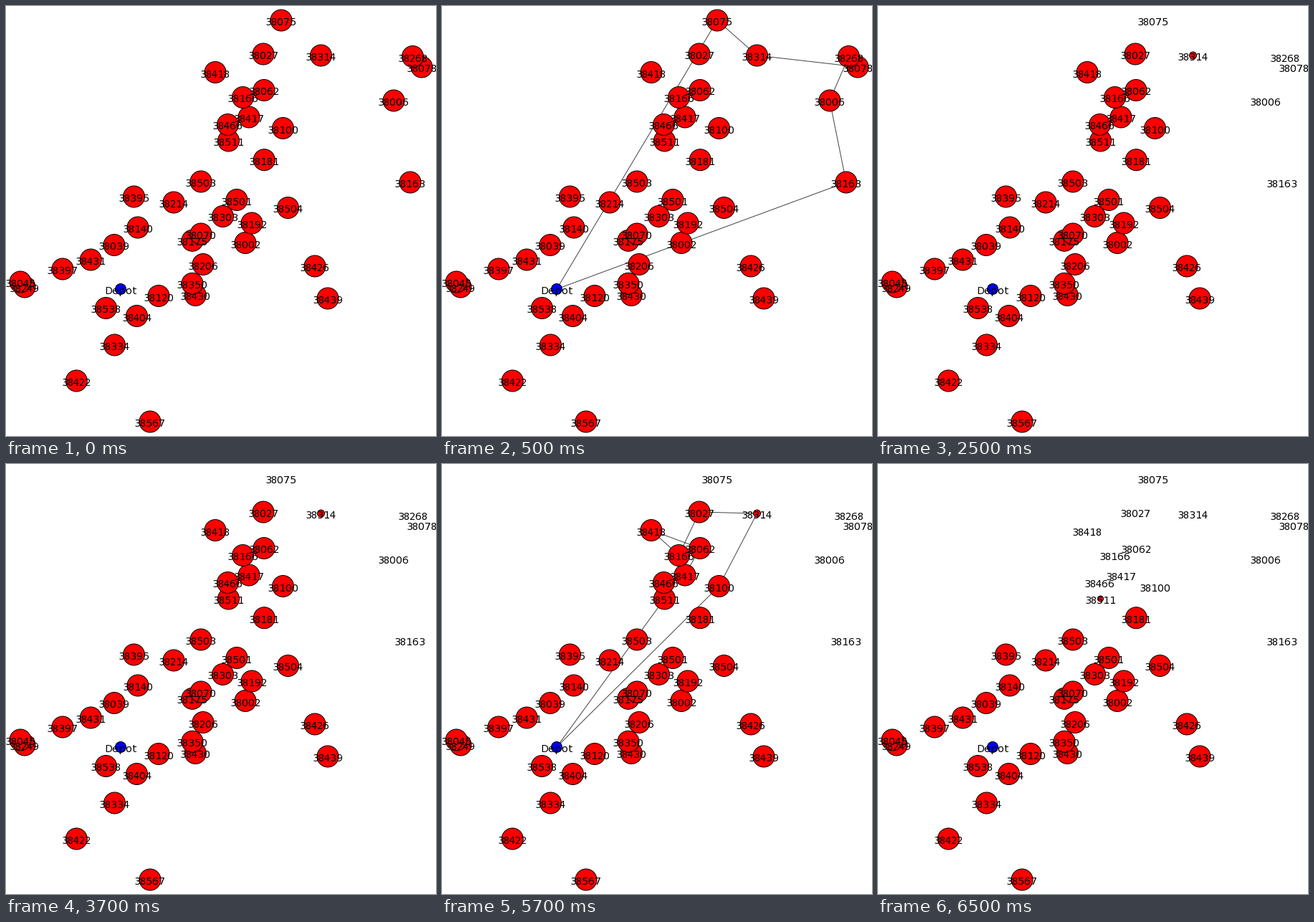
A matplotlib script that plays this animation: 600 px wide and 600 px high, repeating every 8000 ms.

```python
import matplotlib.pyplot as plt
from matplotlib.animation import FuncAnimation
from matplotlib.patches import Circle

SIZE, DPI = 600, 100
PX = 72 / DPI  # points per pixel
FRAMES, INTERVAL = 16, 500
STAGE_STARTS = (1, 5, 9, 13)
FULL_RADIUS, DEPOT_RADIUS = 15, 7.5

plt.rcParams["font.family"] = "DejaVu Sans"
plt.rcParams["text.hinting_factor"] = 1

DEPOT = "Depot"
STOPS = {
    38075: (384, 20), 38027: (359, 67), 38314: (439.5, 69),
    38268: (567.5, 70.5), 38078: (580, 85), 38418: (292, 92.5),
    38062: (360, 117.5), 38166: (330.5, 127.5), 38006: (541, 132),
    38417: (339, 155), 38466: (309.5, 165.5), 38100: (386.5, 170.5),
    38511: (310.5, 188), 38181: (360.3, 214.7), 38503: (272, 245),
    38163: (564, 246), 38395: (178.5, 266), 38501: (322, 270.5),
    38214: (234, 274), 38504: (393.5, 281.5), 38303: (302.5, 293.5),
    38192: (343, 303), 38140: (184, 309), 38070: (272, 318),
    38175: (260, 327.3), 38002: (334, 330.5), 38039: (151, 333.5),
    38431: (118.3, 354), 38206: (275, 360.5), 38426: (431, 363),
    38397: (79, 367), 38045: (20, 385), 38350: (260, 387.3),
    38249: (26, 392), 38430: (264.3, 403.5), 38120: (213, 404.5),
    38439: (449, 408), 38538: (139.5, 421.5), 38404: (182.5, 432.5),
    38334: (151.5, 473), 38422: (98.3, 523), 38567: (201, 580),
}
POSITIONS = {**STOPS, DEPOT: (160, 395)}

ROUTES = (
    (DEPOT, 38163, 38006, 38268, 38078, 38314, 38075, DEPOT),
    (DEPOT, 38100, 38314, 38027, 38166, 38418, 38062, 38417,
     38466, 38511, DEPOT),
)
# Radius left at the stop that each route serves only in part.
PARTIAL = ({38314: 5}, {38511: 4})

fig = plt.figure(figsize=(SIZE / DPI, SIZE / DPI), dpi=DPI, facecolor="white")
ax = fig.add_axes([0, 0, 1, 1])
ax.set_xlim(0, SIZE)
ax.set_ylim(SIZE, 0)
ax.axis("off")


def add_node(name, color, radius):
    x, y = POSITIONS[name]
    node = Circle((x, y), radius, facecolor=color, edgecolor="black",
                  linewidth=PX, zorder=3 - y / SIZE)
    ax.add_patch(node)
    ax.text(x, y + 7, str(name), fontsize=14 * PX, ha="center",
            va="baseline", zorder=4)
    return node


def add_route(route):
    xs, ys = zip(*(POSITIONS[name] for name in route))
    line, = ax.plot(xs, ys, color="#444444", linewidth=PX, zorder=1)
    return line


add_node(DEPOT, "blue", DEPOT_RADIUS)
nodes = {name: add_node(name, "red", FULL_RADIUS) for name in STOPS}
lines = [add_route(route) for route in ROUTES]


def radii_after(completed):
    radii = dict.fromkeys(STOPS, FULL_RADIUS)
    for route, partial in zip(ROUTES[:completed], PARTIAL):
        radii.update(dict.fromkeys(route[1:-1], 0))
        radii.update(partial)
    return radii


def update(frame):
    stage = sum(frame >= start for start in STAGE_STARTS)
    completed, driving = divmod(stage, 2)
    for i, line in enumerate(lines):
        line.set_visible(bool(driving) and i == completed)
    for name, radius in radii_after(completed).items():
        nodes[name].set_radius(radius)
        nodes[name].set_visible(radius > 0)
    return [*lines, *nodes.values()]


anim = FuncAnimation(fig, update, frames=FRAMES, interval=INTERVAL,
                     repeat=True, repeat_delay=0, blit=False)
plt.show()
```
